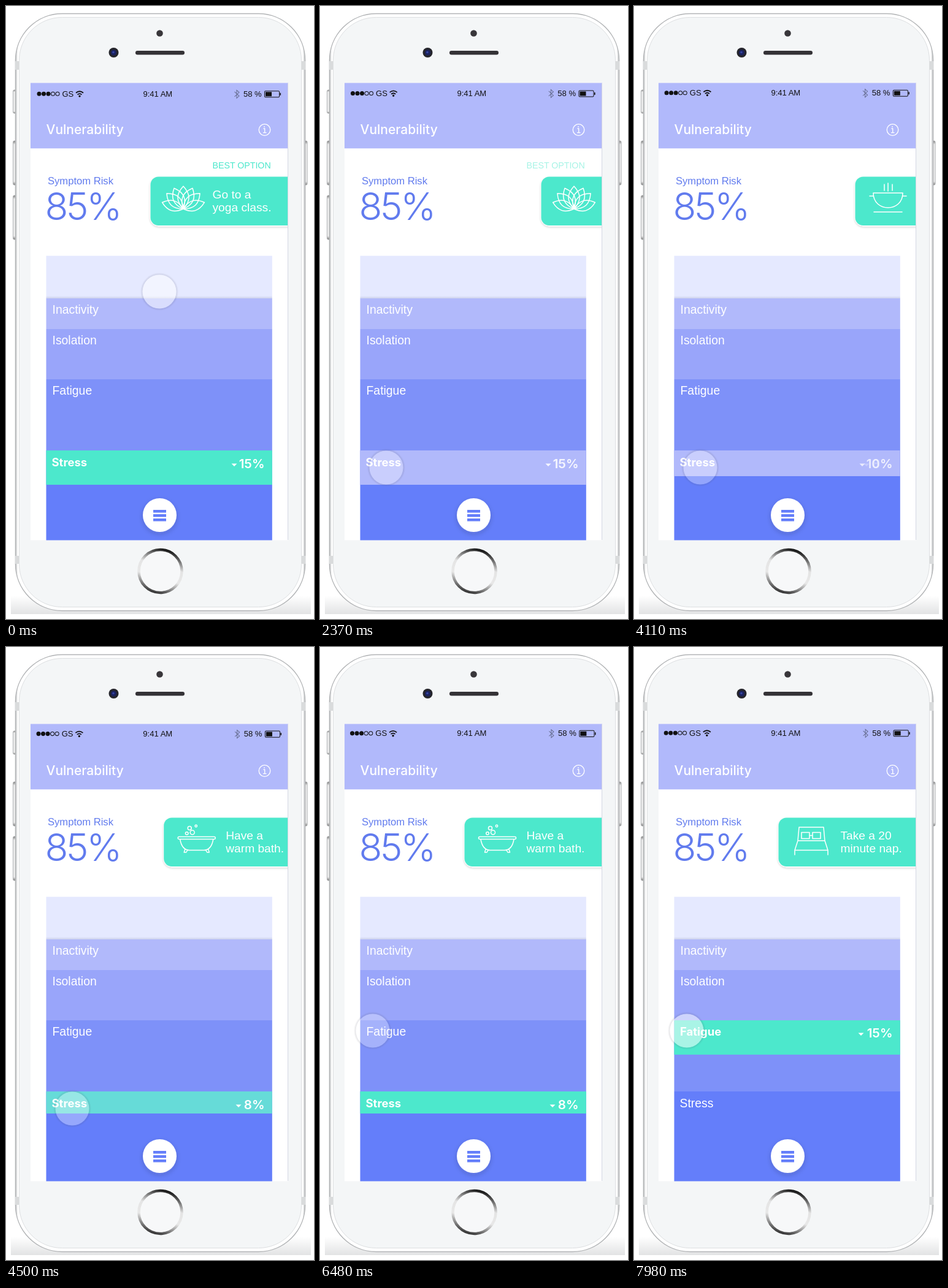
Animation of 502 by 1000 pixels, one loop 8000 ms. Source, as an HTML page:

```html
<!DOCTYPE html>
<html lang="en">
<head>
<meta charset="utf-8">
<style>
  html, body { margin: 0; width: 100%; height: 100%; overflow: hidden; background: #fff }
  svg { display: block; width: 502px; height: 1000px; font-family: "Liberation Sans", Arial, sans-serif }
  .row { font-size: 19.4px; fill: #fff }
  .bold { font: bold 18.5px Inter, sans-serif }
  .pct { font: 600 20.5px Inter, sans-serif; text-anchor: end; fill: #fff }
  .card { font-size: 19.2px; fill: #fff }
  .icon { fill: none; stroke: #fff; stroke-width: 1.5; stroke-linejoin: round; stroke-linecap: round }
</style>
</head>
<body>
<svg viewBox="0 0 502 1000">
  <defs>
    <clipPath id="screen"><rect x="40" y="125.500" width="420" height="746"/></clipPath>
    <linearGradient id="edge">
      <stop offset="0" stop-color="#c0c2c4"/><stop offset=".008" stop-color="#fff"/>
      <stop offset=".992" stop-color="#fff"/><stop offset="1" stop-color="#c0c2c4"/>
    </linearGradient>
    <linearGradient id="key" x2="0" y2="1">
      <stop offset="0" stop-color="#777"/><stop offset=".08" stop-color="#eee"/>
      <stop offset=".92" stop-color="#eee"/><stop offset="1" stop-color="#777"/>
    </linearGradient>
    <linearGradient id="ring" x1=".65" y1="0" x2=".35" y2="1">
      <stop offset="0" stop-color="#151515"/><stop offset=".38" stop-color="#e4e4e4"/>
      <stop offset=".65" stop-color="#e8e8e8"/><stop offset="1" stop-color="#333"/>
    </linearGradient>
    <linearGradient id="ground" x2="0" y2="1">
      <stop offset="0" stop-color="#fff"/><stop offset="1" stop-color="#e2e3e4"/>
    </linearGradient>
    <linearGradient id="fold" x2="0" y2="1">
      <stop offset="0" stop-color="#8088b0" stop-opacity="0"/><stop offset="1" stop-color="#8088b0" stop-opacity=".25"/>
    </linearGradient>
    <filter id="soft" x="-30%" y="-30%" width="160%" height="160%">
      <feDropShadow dx="0" dy="1.500" stdDeviation="1.500" flood-color="#223" flood-opacity=".18"/>
    </filter>
    <filter id="lift" x="-30%" y="-30%" width="160%" height="170%">
      <feDropShadow dx="0" dy="3" stdDeviation="4" flood-color="#223" flood-opacity=".18"/>
    </filter>
  </defs>

  <!-- phone -->
  <rect x="8" y="962" width="489" height="30" fill="url(#ground)"/>
  <g fill="url(#key)" stroke="#b0b2b4">
    <rect x="11.500" y="137" width="6" height="38" rx="2"/>
    <rect x="11.500" y="220" width="6" height="72" rx="2"/>
    <rect x="11.500" y="309" width="6" height="72" rx="2"/>
    <rect x="485" y="220" width="6" height="72" rx="2"/>
  </g>
  <rect x="15.500" y="12.500" width="472" height="974" rx="76" fill="url(#edge)" stroke="#b2b4b6" stroke-width="1.500"/>
  <path fill="#d9dbdc" d="M15 90h7v14h-7zM481 90h7v14h-7zM15 897h7v13h-7zM481 897h7v13h-7z"/>
  <rect x="21.500" y="18.500" width="460" height="962" rx="70" fill="#f4f6f7" stroke="#dddfe1"/>
  <circle cx="250.500" cy="44.500" r="5.300" fill="#38363a"/>
  <circle cx="175.500" cy="76" r="8" fill="#25252c"/>
  <circle cx="175.500" cy="76" r="4.500" fill="#1b2260"/>
  <circle cx="175" cy="75.500" r="1.800" fill="#3444a0"/>
  <rect x="211" y="73" width="80" height="6.500" rx="3.200" fill="#343236"/>
  <circle cx="251.500" cy="922" r="35" fill="#f7f8f9" stroke="url(#ring)" stroke-width="4.500"/>

  <!-- screen -->
  <g clip-path="url(#screen)">
    <rect x="40" y="125" width="420" height="747" fill="#fff"/>
    <rect x="40" y="125" width="420" height="107.300" fill="#b1b9fb"/>
    <text x="65.500" y="209" font-size="21" font-weight="500" font-family="Inter, sans-serif" fill="#fff">Vulnerability</text>
    <g fill="none" stroke="#fff" stroke-width="1.300">
      <circle cx="421.500" cy="202" r="9.300"/>
      <path d="M419.500 200h2.200v6.500M419 206.700h5.500M421 196v2"/>
    </g>

    <g id="status" font-size="13" fill="#111">
      <g stroke="#111">
        <circle cx="54" cy="143.500" r="3"/><circle cx="61.500" cy="143.500" r="3"/><circle cx="69" cy="143.500" r="3"/>
        <g fill="none"><circle cx="76.500" cy="143.500" r="3"/><circle cx="84" cy="143.500" r="3"/></g>
      </g>
      <text x="91.500" y="148">GS</text>
      <g fill="none" stroke="#111" stroke-width="1.800">
        <path d="M114 142q6-5 12 0M116.500 144.800q3.500-3 7 0"/>
        <circle cx="120" cy="147.300" r=".8"/>
      </g>
      <text x="223.500" y="148">9:41 AM</text>
      <path d="M372.500 140l7.500 7-4 3.500v-13l4 3.500-7.500 7" fill="none" stroke="#666d90"/>
      <text x="387" y="148">58 %</text>
      <rect x="421.500" y="139" width="24" height="10" rx="1.500" fill="none" stroke="#111"/>
      <path d="M423 140.500h10v7h-10zM446.500 142h1.500v4h-1.500z"/>
    </g>

    <g fill="#617bee">
      <text x="68" y="290.500" font-size="16.600">Symptom Risk</text>
      <text x="63.500" y="348.500" font-size="62" font-weight="300" letter-spacing="-3" font-family="Inter, sans-serif">85%</text>
    </g>
    <text id="best" x="336.500" y="265" font-size="14.200" fill="#4ce8cc">BEST OPTION</text>

    <g id="card">
      <rect x="234.500" y="278.500" width="300" height="81" rx="15" fill="#fff" filter="url(#soft)"/>
      <rect x="235.500" y="278.500" width="300" height="79.500" rx="13" fill="#4ce8cc"/>
      <g class="option">
        <g class="icon" id="lotus"></g>
        <text class="card" x="336.500" y="313.500">Go to a<tspan x="336.500" dy="21.500">yoga class.</tspan></text>
      </g>
      <g class="option">
        <path class="icon" d="M283 291v10M289 289v13M296 291v10M265 305h48c0 32-48 32-48 0zM259 310h6.500M312.500 310h6.500M266 336h46"/>
        <text class="card" x="336.500" y="313.500">Eat some<tspan x="336.500" dy="21.500">hot soup.</tspan></text>
      </g>
      <g class="option">
        <g class="icon">
          <rect x="258.500" y="309.500" width="61" height="4" rx="2"/>
          <path d="M262 314q3 17 15 17.500h24q12-.5 15-17.500M270 330l-1.500 5h3.500l2-3.500M308 330l1.500 5h-3.500l-2-3.500"/>
          <circle cx="273" cy="304" r="2.300"/><circle cx="282" cy="302.500" r="3.500"/>
          <circle cx="277.500" cy="295.500" r="3"/><circle cx="288" cy="292" r="1.700"/>
        </g>
        <text class="card" x="336.500" y="313.500">Have a<tspan x="336.500" dy="21.500">warm bath.</tspan></text>
      </g>
      <g class="option">
        <path class="icon" d="M267 316l2-22h40l2 22M273 302.500h13v10h-13zM291 302.500h13v10h-13zM286 307.500h5M267 316h44l5 15.500h-54zM262 331.500v7.500M316 331.500v7.500"/>
        <text class="card" x="336.500" y="313.500">Take a 20<tspan x="336.500" dy="21.500">minute nap.</tspan></text>
      </g>
    </g>
    <path d="M459.500 126v745" stroke="#d5d7e4"/>

    <!-- stacked factors -->
    <path fill="#e5e9ff" d="M65.500 407.500h368.300v70h-368.300z"/>
    <path fill="url(#fold)" d="M65.500 473h368.300v4h-368.300z"/>
    <path fill="#b1b9fb" d="M65.500 477h368.300v50h-368.300z"/>
    <path fill="#99a5fa" d="M65.500 527h368.300v82h-368.300z"/>
    <path fill="#7e91f9" d="M65.500 609h368.300v116h-368.300z"/>
    <path fill="#647efa" d="M65.500 725h368.300v147h-368.300z"/>
    <g id="stressBand">
      <rect class="stress" x="65.500" y="725" width="368.300" fill="#b1b9fb"/>
      <rect class="stress" id="stressGreen" x="65.500" y="725" width="368.300" fill="#4ce8cc"/>
      <text class="row bold" x="74.500" y="751">Stress</text>
      <g class="value"><path fill="#fff" d="M367.500 746.500h9l-4.500 4.500z"/><text class="pct" x="421.500" y="753.500">15%</text></g>
      <g class="value"><path fill="#fff" d="M367.500 746.500h9l-4.500 4.500z"/><text class="pct" x="421.500" y="753.500">10%</text></g>
      <g class="value"><path fill="#fff" d="M374.500 746.500h9l-4.500 4.500z"/><text class="pct" x="421.500" y="753.500">8%</text></g>
    </g>
    <g id="fatigueBand">
      <path fill="#b1b9fb" d="M65.500 609h368.300v56h-368.300z"/>
      <path id="fatigueGreen" fill="#4ce8cc" d="M65.500 609h368.300v56h-368.300z"/>
      <text class="row bold" x="75" y="634">Fatigue</text>
      <path fill="#fff" d="M365.500 629.500h9l-4.500 4.500z"/>
      <text class="pct" x="421.500" y="636.500">15%</text>
    </g>
    <text class="row" x="75.500" y="502">Inactivity</text>
    <text class="row" x="75.500" y="552">Isolation</text>
    <text class="row" id="fatiguePlain" x="75.500" y="634">Fatigue</text>
    <text class="row" id="stressPlain" x="74.500" y="750.500">Stress</text>
    <circle cx="250.500" cy="830.500" r="27.500" fill="#fff" filter="url(#lift)"/>
    <path fill="#647efa" d="M240 822h21v4.500h-21zM240 829h21v4.500h-21zM240 836h21v4.500h-21z"/>
  </g>

  <g id="touch">
    <g fill="none" stroke="#445" stroke-opacity=".06">
      <circle r="28.300" stroke-width="1.600"/><circle r="29" stroke-width="3"/>
    </g>
    <circle id="pad" r="27.500" fill="#fff"/>
  </g>
</svg>
<script>
const LOOP = 8000;
const TAPS = [2355, 4080, 6580];
const $ = id => document.getElementById(id);
const all = cls => [...document.getElementsByClassName(cls)];
const options = all('option'), values = all('value'), stressRects = all('stress');

$('lotus').innerHTML = [[0, 37, 12], [24, 37, 12], [47, 37, 12], [73, 36, 11]].flatMap(([angle, h, w]) =>
  (angle ? [-angle, angle] : [0]).map(a =>
    `<path transform="translate(289 331) rotate(${a})" d="M0 0C${-w} ${-h * .35} ${-w} ${-h * .65} 0 ${-h}C${w} ${-h * .65} ${w} ${-h * .35} 0 0"/>`)).join('');

const inOut = p => p < .5 ? 4 * p ** 3 : 1 - 4 * (1 - p) ** 3;
const out = p => 1 - (1 - p) ** 3;
const fade = (el, value) => el.setAttribute('opacity', value);

function draw(t) {
  const ramp = (a, b) => Math.min(1, Math.max(0, (t - a) / (b - a)));
  // Rises and falls again around each tap.
  const pulse = (a, b, c, d, ease = p => p) =>
    TAPS.reduce((sum, tap) => sum + ramp(tap + a, tap + b) - ease(ramp(tap + c, tap + d)), 0);

  const drift = t / LOOP;
  $('status').setAttribute('transform',
    `translate(250 ${143.3 - 3 * drift}) scale(${1 + .009 * drift}) translate(-250 -143.5)`);

  fade($('best'), 1 - ramp(TAPS[0] - 45, TAPS[0] + 75));
  $('card').setAttribute('transform', `translate(${125 * pulse(-30, 10, 200, 700, out)} 0)`);
  const swap = TAPS.map(tap => ramp(tap + 90, tap + 230));
  // The new icon is already in place on the second tap while the row still holds its height.
  options.forEach((el, i) => fade(el, (i === 0 ? 1 : swap[i - 1]) - (swap[i] || 0)));

  const count = TAPS.map(tap => ramp(tap, tap + 120));
  values.forEach((el, i) => fade(el, (i ? count[i - 1] : 1) - (i < 2 ? count[i] : 0)));
  stressRects.forEach(el => el.setAttribute('height', 56 - 14 * swap[0] - 6 * swap[1]));
  fade($('stressGreen'), 1 - pulse(-60, 0, 200, 500));

  const last = TAPS[2], change = ramp(last - 60, last + 60);
  fade($('stressBand'), 1 - change);
  fade($('stressPlain'), change);
  fade($('fatiguePlain'), 1 - change);
  fade($('fatigueBand'), change);
  fade($('fatigueGreen'), ramp(last + 200, last + 600));

  const down = inOut(ramp(1222, 2110)), up = inOut(ramp(5055, 5705));
  $('touch').setAttribute('transform',
    `translate(${250 - 142 * down - 22 * up} ${466 + 287 * down - 127 * up})`);
  fade($('pad'), .52 - .22 * pulse(-300, -150, 400, 600));
}

function tick() {
  draw(performance.now() % LOOP);
  requestAnimationFrame(tick);
}
tick();
</script>
</body>
</html>
```
